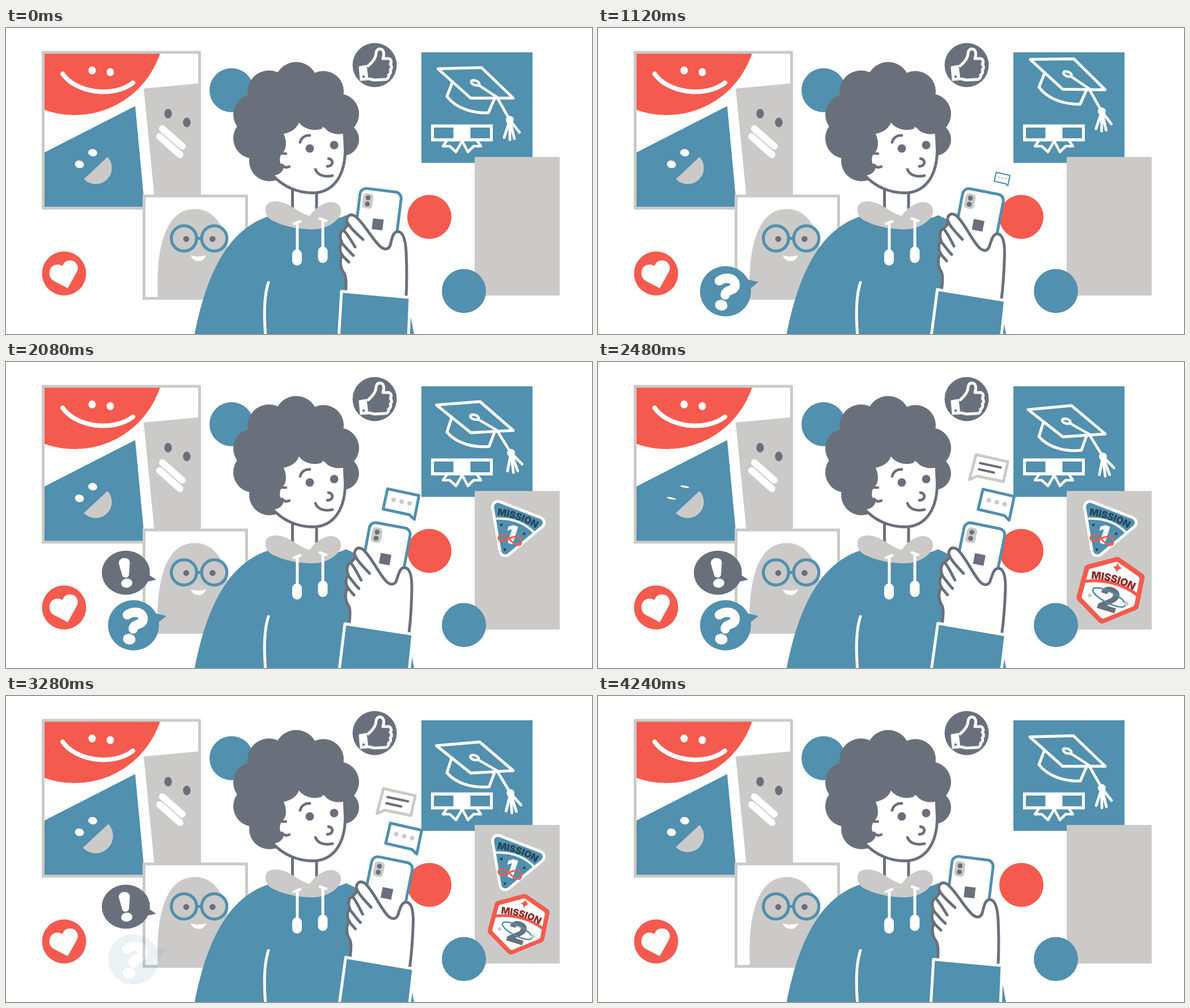
An HTML page with a canvas for the animation above (4.32 s loop, 1034 px wide and 541 px high).

```html
<!DOCTYPE html>
<html lang="en">
<head>
<meta charset="utf-8">
<title>Learning online</title>
<style>
html, body { margin: 0; width: 100%; height: 100%; overflow: hidden; background: #fff; }
canvas { display: block; width: 1034px; height: 541px; }
</style>
</head>
<body>
<canvas id="stage"></canvas>
<script>
const W = 1034, H = 541, LOOP = 4320, STEP = 80;
const BLUE = '#5190ae', RED = '#f45b4e', GREY = '#cbcac8', DARK = '#6a707b', WHITE = '#fff', NAVY = '#24465a';
const ratio = window.devicePixelRatio || 1;
function context(canvas) {
  canvas.width = W * ratio;
  canvas.height = H * ratio;
  const ctx = canvas.getContext('2d');
  ctx.lineCap = ctx.lineJoin = 'round';
  return ctx;
}
const stage = context(document.getElementById('stage'));
const veil = context(document.createElement('canvas'));
let c = stage;
const rad = deg => deg * Math.PI / 180;
const clamp = v => Math.max(0, Math.min(1, v));

// ---- drawing helpers ----
function fill(d, color) {
  c.fillStyle = color;
  c.fill(new Path2D(d));
}
function line(d, color, width) {
  c.strokeStyle = color;
  c.lineWidth = width;
  c.stroke(new Path2D(d));
}
function both(d, inside, edge, width) {
  fill(d, inside);
  line(d, edge, width);
}
function oval(x, y, rx, ry, color, turn = 0) {
  c.fillStyle = color;
  c.beginPath();
  c.ellipse(x, y, rx, ry, rad(turn), 0, 7);
  c.fill();
}
const disc = (x, y, r, color) => oval(x, y, r, r, color);
function ring(x, y, rx, ry, color, width, turn = 0) {
  c.strokeStyle = color;
  c.lineWidth = width;
  c.beginPath();
  c.ellipse(x, y, rx, ry, rad(turn), 0, 7);
  c.stroke();
}
function box(x, y, w, h, color) {
  c.fillStyle = color;
  c.fillRect(x, y, w, h);
}
function pill(x, y, w, h, r) {
  c.beginPath();
  c.roundRect(x, y, w, h, r);
}
// Paints a group on its own layer, so that it fades as one picture.
function faded(alpha, draw) {
  if (alpha >= 1) return draw();
  const place = c.getTransform();
  c = veil;
  c.resetTransform();
  c.clearRect(0, 0, W * ratio, H * ratio);
  c.setTransform(place);
  draw();
  c = stage;
  c.save();
  c.resetTransform();
  c.globalAlpha = alpha;
  c.drawImage(veil.canvas, 0, 0);
  c.restore();
}
function about(x, y, { turn = 0, scale = 1, alpha = 1 }, draw) {
  if (scale <= 0 || alpha <= 0) return;
  c.save();
  c.translate(x, y);
  c.rotate(turn);
  c.scale(scale, scale);
  c.translate(-x, -y);
  faded(alpha, draw);
  c.restore();
}
const font = size => `900 ${size}px Inter, sans-serif`;
function label(text, x, y, size, color, turn) {
  c.save();
  c.translate(x, y);
  c.rotate(rad(turn));
  c.font = font(size);
  c.textAlign = 'center';
  c.textBaseline = 'middle';
  c.fillStyle = color;
  c.fillText(text, 0, 0);
  c.restore();
}
function arcLabel(text, x, y, r, mid, size, color) {
  c.font = font(size);
  let a = rad(mid) - c.measureText(text).width / r / 2;
  for (const ch of text) {
    const half = c.measureText(ch).width / r / 2;
    a += half;
    label(ch, x + r * Math.sin(a), y - r * Math.cos(a), size, color, a * 180 / Math.PI);
    a += half;
  }
}

// ---- timing helpers ----
// Smooth curve through [time, value] keys, flat at every turning point.
function curve(keys, t) {
  let i = 0;
  while (i < keys.length - 2 && t >= keys[i + 1][0]) i++;
  const slope = k => {
    if (k < 1 || k > keys.length - 2) return 0;
    const [a, b, d] = [keys[k - 1], keys[k], keys[k + 1]];
    return (b[1] - a[1]) * (d[1] - b[1]) <= 0 ? 0 : (d[1] - a[1]) / (d[0] - a[0]);
  };
  const [t0, v0] = keys[i], [t1, v1] = keys[i + 1];
  const span = t1 - t0, u = clamp((t - t0) / span), w = 1 - u;
  return v0 * w * w * (1 + 2 * u) + v1 * u * u * (3 - 2 * u)
    + span * u * w * (slope(i) * w - slope(i + 1) * u);
}
const grow = (t, start, span = 320) => 1 - (1 - clamp((t - start) / span)) ** 2;
function pop(t, start, span = 280) {
  const u = clamp((t - start) / span) - 1;
  return 1 + 2.7 * u ** 3 + 1.7 * u ** 2;
}
const fade = (t, start, end) => 1 - clamp((t - start) / (end - start));
const lid = (t, mid) => Math.max(0.06, Math.min(1, Math.abs(t - mid) / 150));

const CAP_Y = [[0, 124], [360, 122.5], [720, 119], [1160, 109], [1440, 111.5], [2080, 121], [2800, 131.5], [3120, 132.5], [3280, 132], [3920, 127], [4320, 124]];
const CAP_TURN = [[0, 0], [720, 1], [1440, 0], [2080, -3], [2800, -4], [3280, -3.3], [4320, 0]];
const TASSEL = [[0, 0], [720, 1], [1440, -1], [2080, -7], [2800, -6], [3280, -4], [4320, 0]];
const ARM = [[0, 0], [600, 0], [720, 0.006], [1400, 0.095], [2080, 0.062], [2720, 0.088], [3280, 0.077], [3920, 0], [4320, 0]];
const LAUGH = [[0, 1], [2640, 1], [3280, 1.08], [3520, 1.09], [4320, 1]];

// ---- scene parts ----
function bigPicture(t) {
  c.save();
  c.beginPath();
  c.rect(65, 42, 277, 277);
  c.clip();
  disc(121, -5, 159, RED);
  line('M100 81C122 114 188 124.500 224 97', WHITE, 8);
  oval(152, 75, 6.5, 7, WHITE);
  oval(184, 78, 6.5, 7, WHITE);

  fill('M243 107L344 97.5V320H264Z', GREY);
  const blink = lid(t, 720);
  oval(286, 151.5, 6.7, 8.5 * blink, DARK);
  oval(319, 167, 6.7, 8.5 * blink, DARK);
  line('M276 178L311 209M271 192L307 224', WHITE, 12);

  fill('M65 221.5L228 138L245 320H65Z', BLUE);
  const wink = lid(t, 2520);
  oval(153, 220.5, 8, 6.5 * wink, WHITE, 10);
  oval(129.5, 241, 8, 6.7 * wink, WHITE, 10);
  about(160, 250, { scale: curve(LAUGH, t) }, () => {
    c.fillStyle = GREY;
    c.beginPath();
    c.arc(158.3, 247.5, 28.5, rad(-43), rad(137));
    c.fill();
  });
  c.restore();
  c.strokeStyle = GREY;
  c.lineWidth = 5;
  c.strokeRect(65.5, 43, 276, 275.5);
}

function smallPicture() {
  box(241, 294.5, 186, 186, GREY);
  box(246, 299.5, 176, 176, WHITE);
  fill('M268 476C264 400 277 320 333 320C366 320 393 350 394 420V476Z', GREY);
  ring(314, 372, 22.3, 22.3, BLUE, 5.3);
  ring(367.5, 372, 22.3, 22.3, BLUE, 5.3);
  line('M338 372H344', BLUE, 5);
  disc(318, 373, 5.3, DARK);
  disc(364.5, 373, 5.3, DARK);
  fill('M326 402Q339 406 353 402Q350 412 339 412Q329 411 326 402Z', WHITE);
}

function icons() {
  disc(398, 110, 39, BLUE);
  disc(747, 334, 39, RED);
  disc(808, 465, 39, BLUE);
  disc(102.5, 434, 39, RED);
  fill('M109 460L84 447C73 440 75 423 86 419C92 417 97 419 100 421C101 415 106 411 113 411C124 411 130 422 125 431Z', WHITE);
  disc(650.5, 65.5, 39, DARK);
  both('M624 69L635 67L638 91L626 92Z', WHITE, WHITE, 3);
  disc(631, 86, 2.2, DARK);
  line('M639 67C645 62 650 56 652 50C653 44 653 38 659 37C667 37 668 45 665 54L675 54C680 55 681 61 678 64C681 67 681 72 678 74C680 78 678 82 675 83C676 87 673 91 669 91L650 92L641 90', WHITE, 5);
}

function graduation(t) {
  box(733, 43, 196, 195.5, BLUE);
  box(750, 170.5, 109, 30, WHITE);
  box(755, 176, 34.5, 19, BLUE);
  box(819.5, 176, 34.5, 19, BLUE);
  line('M778 199L771 209L783 209L794 219L805 200L815 219L825 209L838 209L831 199', WHITE, 4.6);

  c.save();
  const y = curve(CAP_Y, t), turn = curve(CAP_TURN, t), sway = curve(TASSEL, t);
  c.translate(0, y - 124);
  about(895, 124, { turn: rad(turn) }, () => {
    line('M762 72L839 70L895 124L820 124ZM788 95L778 121C795 143 825 151 851 150L862 125', WHITE, 5);
    ring(828, 97, 7.5, 4, WHITE, 4.5, 20);
    line('M834 101L866 122', WHITE, 4.5);
  });
  const bx = 889 - sway * 0.3, by = 162.5 - turn * 0.4;
  line(`M866 ${122 - turn * 0.5}L${bx} ${by}`, WHITE, 4.8);
  disc(bx, by, 7, WHITE);
  about(bx, by, { turn: rad(sway) }, () =>
    line(`M${bx} ${by}l-10 31M${bx} ${by}l0 35M${bx} ${by}l8 33M${bx} ${by}l17 22`, WHITE, 4.8));
  c.restore();
}

function badgeOne() {
  const shape = 'M868 256L940 284L881 333Z';
  both(shape, WHITE, WHITE, 24);
  both(shape, BLUE, BLUE, 14);
  line('M861 277Q906 274 932 302', WHITE, 4);
  arcLabel('MISSION', 851, 427, 162, 19, 17, NAVY);
  label('1', 890, 307, 45, WHITE, 18);
  line('M909 316C911 330 896 322 889 314C882 304 868 303 869 312C871 321 882 314 893 310C902 307 909 308 909 316', RED, 3);
  fill('M870 288l6-3v6ZM911 305l4-5l2 6ZM878 329l6 2l-5 4Z', NAVY);
}

function badgeTwo() {
  const shape = 'M870 370L915 358L951 383L942 428L891 449L858 415Z';
  both(shape, RED, RED, 16);
  about(905, 404, { scale: 0.91 }, () => both(shape, WHITE, WHITE, 9));
  line('M864 389Q911 384 947 411', RED, 5);
  arcLabel('MISSION', 867, 539, 159, 15.5, 16.5, '#8f2f2c');
  fill('M916 359Q917 366 923 368Q916 369 914 376Q914 369 908 366Q915 366 916 359Z', RED);
  label('2', 901, 421, 53, DARK, 17);
  ring(902, 415, 29, 9, BLUE, 2.6, 27);
  disc(871, 412, 3, GREY);
  disc(930, 425, 3.5, GREY);
}

function question() {
  oval(225, 465.5, 45, 44.5, BLUE);
  fill('M262 444L283 449L266 463Z', BLUE);
  line('M214 447C222 440 242.500 440 242 455C241 466 226 461 224.500 472', WHITE, 16.5);
  oval(217.5, 490, 11, 9.5, WHITE, 10);
}

function exclamation() {
  oval(211.5, 372.5, 42.5, 39, DARK);
  fill('M249 374L265 385L246 389Z', DARK);
  fill('M199 356C198 344 219 343 218.500 355L217 376C216 383 206 383 205 377Z', WHITE);
  oval(213, 391, 10, 8, WHITE, -8);
}

function body() {
  fill('M333 541C352 444 388 353 470 331C505 346 565 348 600 331C660 355 702 430 720 541Z', BLUE);
  line('M463 450C455 475 455 510 458 545', WHITE, 5);
  fill('M503 280H550V325L536 336L503 325Z', WHITE);
  line('M505.500 283V318M548 288V318', DARK, 5);
  fill('M458 322C457 310 468 305 480 307C502 309 518 329 536 332C550 312 570 303 583 310C594 316 594 330 583 340C570 352 555 356 540 356C510 356 480 347 466 338C460 333 458 328 458 322Z', GREY);
  line('M508 346L519 342M514 345V392M554 337L565 341M559 340V386', WHITE, 5);
  line('M513.500 400V411.500M559 395V407', WHITE, 17);
}

function head(t) {
  for (const [x, y, r] of [[512, 98, 38], [464, 113, 38], [437, 153, 36], [437, 195, 36],
    [465, 235, 36], [560, 112, 36], [587, 152, 36], [594, 197, 29], [500, 155, 62]]) disc(x, y, r, DARK);
  fill('M517 167C528 182 550 183 562 176C570 187 585 190 598 186L598 215C598 255 580 291 541 291C510 291 486 277 471 261C482 260 489 254 490 246C482 242 481 228 487 222C491 218 494 212 494 205C494 198 492 192 490 187C502 185 513 178 517 167Z', WHITE);
  line('M471 261C490 281 515 291.500 541 291.500C582 291 598.500 255 598.500 215L597 182', DARK, 5);
  line('M487 222H494M487 242C491 247 496 247 500 245', DARK, 4.5);
  line('M519 202C521 194 528 189 536 190M546 250C550 261 563 264 576 261', DARK, 4.8);
  line('M569 231C578 232 579 244 567 244.500', DARK, 4.8);
  const blink = lid(t, 2800);
  oval(536, 213, 7.5, 7.5 * blink, DARK);
  oval(579, 207, 7.5, 7.5 * blink, DARK);
}

function phone() {
  c.save();
  c.translate(626, 282.500);
  c.rotate(rad(7));
  pill(0, 0, 73, 120, 11);
  c.fillStyle = WHITE;
  c.fill();
  c.strokeStyle = BLUE;
  c.lineWidth = 5;
  c.stroke();
  pill(6, 8, 18, 27, 6);
  c.fillStyle = GREY;
  c.fill();
  disc(15, 16, 4.4, DARK);
  disc(15, 27, 4.4, DARK);
  box(28, 51, 19, 19, DARK);
  c.restore();
}

function hand() {
  both('M599 475C601 448 600 440 597 434C589 424 588 408 594 402C588 396 588 384 593 380C588 370 589 360 596 357L603 348C598 335 605 327 615 332C630 342 645 372 660 386C668 393 675 392 678 384C681 372 683 360 691 360C702 360 705 378 706 395C707 420 708 440 706 475', WHITE, DARK, 5);
  line('M602 343C606 352 617 362 630 374M596 358C604 366 610 378 616 387M593 381C600 388 606 396 613 402M594 403L605 414', DARK, 5);
  both('M592 465.500L713 476.500L708 600H584Z', BLUE, WHITE, 5);
}

function chatDots() {
  both('M684 225.500L739 239L729.500 281L721 272.500L675 261Z', WHITE, BLUE, 5);
  disc(694, 245, 4, GREY);
  disc(708, 249, 4, GREY);
  disc(722, 252.500, 4, GREY);
}

function chatLines() {
  both('M670 164L726 177L718 212L672 202L658 208Z', WHITE, GREY, 5);
  line('M677 179L713 187M675 190L701 196', DARK, 4.2);
}

function scene(t) {
  c.setTransform(ratio, 0, 0, ratio, 0, 0);
  box(0, 0, W, H, WHITE);
  bigPicture(t);
  smallPicture();
  graduation(t);
  box(827, 228, 150, 245, GREY);
  icons();
  about(904, 294, { scale: pop(t, 1120), alpha: fade(t, 3600, 3920) }, badgeOne);
  about(905, 404, { scale: pop(t, 2320), alpha: fade(t, 3920, 4240) }, badgeTwo);
  about(283, 449, { scale: grow(t, 560), alpha: fade(t, 2960, 3320) }, question);
  about(265, 385, { scale: grow(t, 1680), alpha: fade(t, 3440, 3800) }, exclamation);
  body();
  head(t);

  const swing = curve(ARM, t), chatAlpha = fade(t, 3440, 3800);
  const onArm = (turn, alpha, draw) => about(640, 560, { turn, alpha }, draw);
  onArm(swing, 1, () => { phone(); hand(); });
  onArm(swing - 0.094, chatAlpha, () => about(730, 281, { scale: grow(t, 1040) }, chatDots));
  onArm(swing - 0.087, chatAlpha, () => about(658, 208, { scale: grow(t, 2160) }, chatLines));
}

const begin = performance.now();
function play() {
  const t = (performance.now() - begin) % LOOP;
  scene(Math.floor(t / STEP) * STEP);
  requestAnimationFrame(play);
}
play();
</script>
</body>
</html>
```
